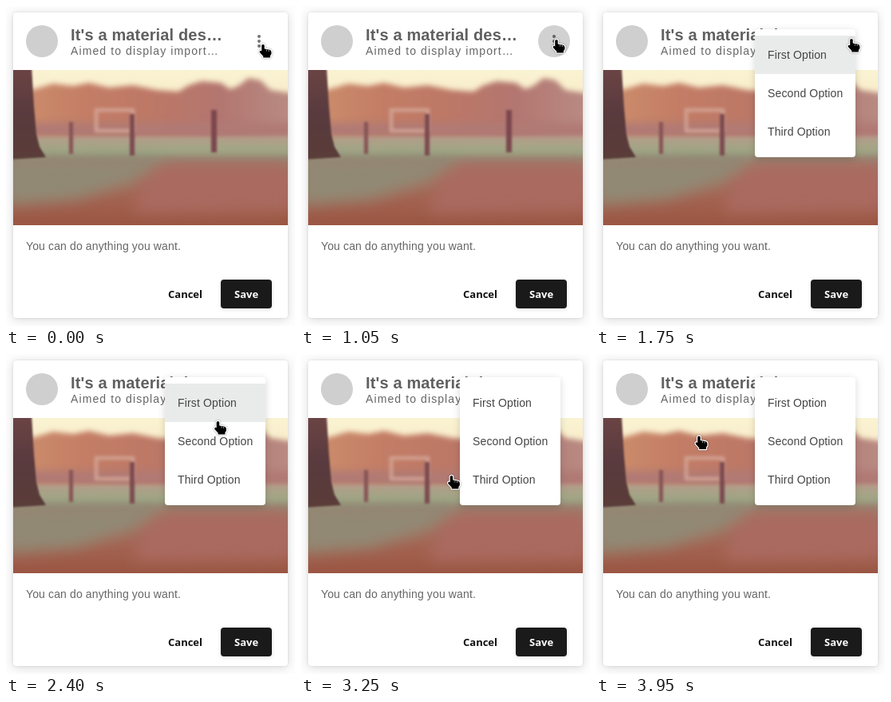
Write an HTML page with a canvas that moves like this. It is 362x400 px and loops after 4 s.

```html
<!DOCTYPE html>
<html lang="en">
<head>
<meta charset="utf-8">
<title>Card with menu</title>
<style>
  html, body { margin: 0; width: 100%; height: 100%; overflow: hidden; background: #fdfdfd; }
  #stage { position: relative; width: 362px; height: 400px; overflow: hidden; }
  #stage div, #stage canvas, #stage svg { position: absolute; }
  .card {
    left: 9px; top: 8px; width: 344px; height: 382px; border-radius: 4px; background: #fff;
    box-shadow: 0 2px 12px rgba(0,0,0,.14), 0 0 3px rgba(0,0,0,.1);
  }
  .text { font: 14px/16px "Liberation Sans", Arial, sans-serif; color: #666; white-space: nowrap; }
  .title { left: 81px; top: 25px; font-weight: bold; font-size: 20px; line-height: 22px; letter-spacing: .15px; color: #606060; }
  .sub { left: 81px; top: 48px; letter-spacing: 1.1px; }
  .body { left: 25px; top: 292px; letter-spacing: .13px; }
  .label { top: 351px; font: bold 13px/18px "Noto Sans", "Open Sans", sans-serif; white-space: nowrap; color: #111; }
  .avatar { left: 25px; top: 24px; width: 40px; height: 40px; border-radius: 50%; background: #cfcfcf; }
  .save {
    left: 269px; top: 342px; width: 64px; height: 36px; border-radius: 4px; background: #1a1a1a;
    box-shadow: 0 1px 5px rgba(0,0,0,.14);
  }
  .dot { left: 315px; width: 4px; height: 4px; border-radius: 50%; background: #757575; }
  #ripple { left: 297px; top: 24px; width: 40px; height: 40px; border-radius: 50%; background: rgba(0,0,0,.18); }
  #menu {
    left: 199px; top: 29px; width: 126px; height: 160px; border-radius: 4px; background: #fff;
    transform-origin: top right;
    box-shadow: 0 2px 10px rgba(0,0,0,.16);
  }
  .item { left: 0; width: 126px; height: 48px; }
  .item .text { left: 16px; top: 16px; letter-spacing: .14px; color: #444; }
  #photo { left: 9px; top: 80px; }
  #hand { left: 0; top: 0; overflow: visible; filter: drop-shadow(.5px .5px .8px rgba(0,0,0,.4)); }
</style>
</head>
<body>
<div id="stage">
  <div class="card"></div>
  <div class="avatar"></div>
  <div class="text title">It's a material des…</div>
  <div class="text sub">Aimed to display import…</div>
  <div class="dot" style="top:36px"></div>
  <div class="dot" style="top:42px"></div>
  <div class="dot" style="top:48px"></div>
  <div id="ripple"></div>
  <canvas id="photo" width="344" height="194"></canvas>
  <div class="text body">You can do anything you want.</div>
  <div class="save"></div>
  <div class="label" style="left:203px">Cancel</div>
  <div class="label" style="left:286px;color:#fff">Save</div>
  <div id="menu">
    <div class="item" style="top:8px"><div class="text">First Option</div></div>
    <div class="item" style="top:56px"><div class="text">Second Option</div></div>
    <div class="item" style="top:104px"><div class="text">Third Option</div></div>
  </div>
  <svg id="hand" width="16" height="19">
    <path d="M-1.8 1.5Q-1.6 0 0 0Q1.6 0 1.7 1.5V5.6L8.2 6.8Q10.4 7.3 10.4 9.4V12L8.9 14.2V16.6H.2V14.8L-4 10.2Q-5 8.6-3.6 7.9Q-2.6 7.6-1.8 8.6Z"
      fill="#000" stroke="#fff" stroke-width="2.4" stroke-linejoin="round" paint-order="stroke"/>
    <path d="M4.4 6.4V8.6M7.2 6.9V9" stroke="#fff" stroke-width=".6"/>
  </svg>
</div>
<script>
const LOOP = 4000, STEP = 50;
const $ = id => document.getElementById(id);
const items = [...document.querySelectorAll('.item')];
const clamp = v => Math.min(1, Math.max(0, v));
const span = (t, a, b) => clamp((t - a) / (b - a));
const ease = p => p * p * (3 - 2 * p);

// Soft park scene: sky, trees, meadow, fence, leafy path and a trunk
function paintPhoto() {
  const g = $('photo').getContext('2d');
  const fade = (x, y, ...colors) => {
    const f = g.createLinearGradient(x[0], y[0], x[1], y[1]);
    colors.forEach((c, i) => f.addColorStop(i / (colors.length - 1), c));
    return f;
  };
  const down = (y0, y1, ...colors) => fade([0, 0], [y0, y1], ...colors);
  const soft = px => { g.filter = `blur(${px}px)`; };
  const rect = (x, y, w, h, fill) => { g.fillStyle = fill; g.fillRect(x, y, w, h); };
  const poly = (points, fill) => {
    g.fillStyle = fill;
    g.beginPath();
    points.forEach(p => g.lineTo(...p));
    g.fill();
  };

  rect(0, 0, 344, 90, down(0, 50, '#faf3d2', '#f7e8c6'));
  soft(3);
  poly([
    [-10, 32], [30, 23], [50, 17], [75, 20], [95, 16], [120, 22], [150, 19], [180, 25], [207, 27],
    [220, 19], [236, 14], [260, 16], [272, 24], [282, 20], [295, 10], [310, 13], [322, 25], [354, 30],
    [354, 95], [-10, 95]
  ], fade([0, 344], [0, 0], '#cc8f6c', '#c47e66', '#bd7866', '#b37670', '#b88a82'));
  soft(5);
  rect(-10, 66, 364, 18, '#b07a74');
  soft(2);
  g.strokeStyle = '#d3a596';
  g.lineWidth = 4;
  g.strokeRect(104, 50, 46, 26);
  rect(-10, 83, 364, 32, down(83, 115, '#b59c89', '#a2a787', '#949d80'));
  soft(3);
  rect(-10, 108, 364, 100, down(108, 194, '#958a76', '#a57362', '#a3614f', '#9a5643'));
  soft(9);
  poly([[-10, 112], [185, 110], [150, 138], [80, 162], [-10, 170]], '#918974');
  poly([[190, 116], [350, 116], [350, 175], [150, 178], [165, 140]], '#aa6a60');
  soft(1.5);
  rect(70, 65, 5, 40, '#875456');
  rect(146, 55, 6, 52, '#7c4a4f');
  rect(248, 50, 7, 53, '#7c474e');
  soft(1);
  poly([[-5, -5], [23, -5], [26, 45], [29, 80], [33, 96], [41, 109], [-5, 112]], down(0, 110, '#6b4444', '#593a3e', '#5a3c38'));
}

// Pointer tip: time, x, y
const path = [
  [0, 322, 48], [750, 322, 48], [1000, 320, 42], [1650, 320, 42], [1750, 320, 41],
  [1850, 320, 41], [2400, 265.5, 84], [2850, 188.5, 152], [3350, 188.5, 152], [3950, 129, 102.5]
];

function tipAt(t) {
  const i = path.findIndex(p => p[0] > t);
  if (i < 0) return path[path.length - 1].slice(1);
  const a = path[i - 1], b = path[i], p = ease(span(t, a[0], b[0]));
  return [a[1] + (b[1] - a[1]) * p, a[2] + (b[2] - a[2]) * p];
}

function draw() {
  const t = Math.floor(performance.now() % LOOP / STEP) * STEP;
  const [x, y] = tipAt(t);
  $('hand').style.transform = `translate(${x}px, ${y}px)`;

  $('ripple').style.opacity = span(t, 900, 1000) * (1 - span(t, 1200, 1400));

  const open = span(t, 1150, 1270);
  $('menu').style.opacity = open;
  $('menu').style.transform = `scale(${.8 + .2 * ease(open)})`;

  const over = open && x > 199 && x < 325 ? Math.floor((y - 36.5) / 48) : -1;
  items.forEach((el, i) => { el.style.background = i === over ? '#e9ebea' : 'none'; });
  requestAnimationFrame(draw);
}

paintPhoto();
draw();
</script>
</body>
</html>
```
